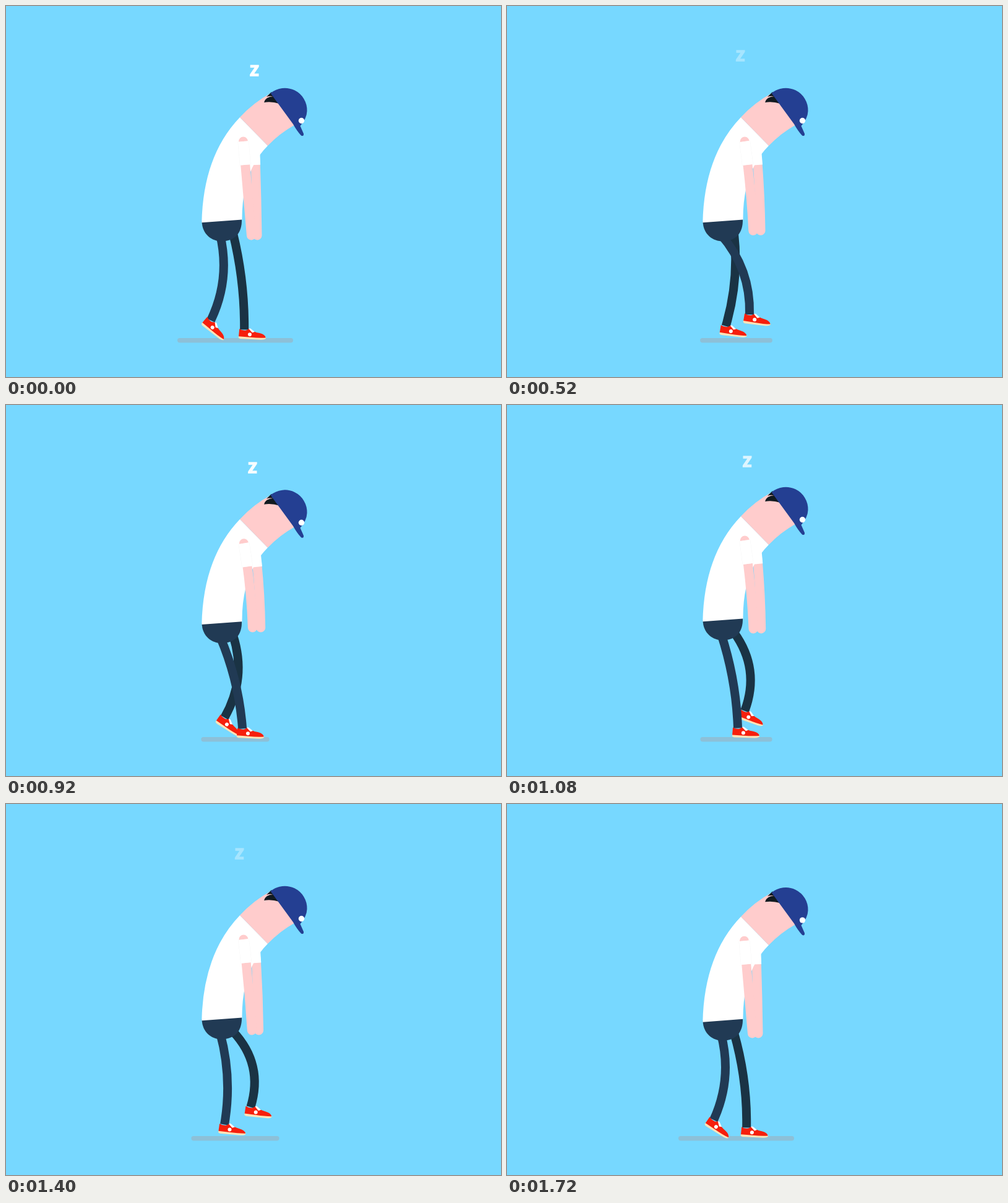
These frames come from a looping animation (800 px wide and 600 px high, 1760 ms). An HTML page:

```html
<!DOCTYPE html>
<html lang="en">
<head>
<meta charset="utf-8">
<title>Sleepwalker</title>
<style>
  html, body { margin: 0; width: 100%; height: 100%; overflow: hidden; background: #77d8ff; }
  svg { display: block; width: 100%; height: 100%; }
  .line { fill: none; }
  .arm { stroke: #fcc; stroke-width: 15; stroke-linecap: round; stroke-dasharray: 0 30 999; }
  .sleeve { stroke: #fff; stroke-dasharray: 38 999; }
  .hem { stroke: #f7f7f7; stroke-width: 18; stroke-dasharray: 38 999; }
  .leg { stroke-width: 14; }
  #z { font: 900 23px Lato, "Open Sans", sans-serif; fill: #fff; stroke: #fff; stroke-width: 1.5px; text-anchor: middle; }
</style>
</head>
<body>
<svg viewBox="0 0 800 600">
  <defs>
    <g id="shoe">
      <path fill="#fde3b8" d="M-8.500 9 L-9 13 Q-8 15 -4 15 L27 15.500 Q35 15.500 35.500 12 L32 9Z"/>
      <path fill="#f61f0c" d="M-8 -1 Q-3 2 3 1 L8 -2 Q14 3 25 5 Q34 7 35 12 Q24 13 10 12 L-8.800 11Z"/>
      <path fill="#fff" d="M7 -1.500 L9.500 -2.500 L17 3 L13 4.500Z"/>
      <circle cx="9" cy="7.500" r="3" fill="#fff"/>
    </g>
  </defs>

  <rect id="shadow" y="537" height="7.500" rx="3.700" fill="#8dc0d8"/>

  <path id="farLeg" class="line leg" stroke="#1a3344"/>
  <use id="farShoe" href="#shoe"/>
  <path id="nearLeg" class="line leg" stroke="#213a54"/>
  <use id="nearShoe" href="#shoe"/>

  <path id="farArm" class="line arm"/>
  <path id="farSleeve" class="line sleeve" stroke-width="15.500"/>

  <g id="body">
    <path fill="#213a54" d="M316.500 348 C317 370 333 380.500 349 380.500 C369 380 382 368 381 344Z"/>
    <path fill="#fff" d="M378 180 Q318.500 242 316.300 350.300 L381.500 345.500 Q381 268 423 226Z"/>
    <path fill="#fcc" d="M378 180 Q400 156 428 141 L467 192 Q442 206 423 226Z"/>
    <path fill="#111a20" d="M421 147 L429 139 L434 147 Q427 144.500 421 147Z M417 156 Q419 147 432 146 L442 158 Q429 154 417 156Z"/>
    <path fill="#243f92" d="M427.500 141 A36 36 0 0 1 486.500 170 Q486 182 475.500 194 L481 206.500 Q481.500 211.500 477 209.500 Q470 202 464 191Z"/>
    <circle cx="477.500" cy="185.500" r="4.700" fill="#fff"/>
  </g>

  <path id="nearArm" class="line arm"/>
  <path id="nearHem" class="line hem"/>
  <path id="nearSleeve" class="line sleeve" stroke-width="17"/>

  <text id="z">Z</text>
</svg>
<script>
  const STEP = 40, STEPS = 44, HALF = STEPS / 2;
  const LANDING = 21, TOE_OFF = LANDING + HALF;

  // Key points of one stride: step, ankle x, shoe angle
  const stride = [[0, 331, 37], [5, 377, 21], [13, 392, 6], [LANDING, 386, 2], [35, 353, 4], [TOE_OFF, 334, 31]];
  const legs = {
    near: { hip: [346, 370], lead: 0, shift: 0, lift: 22, skew: 1 },
    far: { hip: [367, 368], lead: HALF + 1, shift: 3, lift: 31, skew: 1.3 }
  };

  const $ = id => document.getElementById(id);
  const set = (id, attrs) => {
    for (const name in attrs) $(id).setAttribute(name, attrs[name]);
  };

  // Smooth periodic interpolation through key points
  function sample(keys, step) {
    const count = keys.length;
    const at = i => {
      const lap = Math.floor(i / count);
      const [time, ...values] = keys[i - lap * count];
      return { time: time + lap * STEPS, values };
    };
    let i = 0;
    while (i < count - 1 && keys[i + 1][0] <= step) i++;
    const [p, a, b, n] = [at(i - 1), at(i), at(i + 1), at(i + 2)];
    const span = b.time - a.time, u = (step - a.time) / span;
    return a.values.map((va, k) => {
      const vb = b.values[k];
      const slopeA = (vb - p.values[k]) / (b.time - p.time) * span;
      const slopeB = (n.values[k] - va) / (n.time - a.time) * span;
      return va + u * slopeA
        + u * u * (3 * (vb - va) - 2 * slopeA - slopeB)
        + u * u * u * (2 * (va - vb) + slopeA + slopeB);
    });
  }

  // Curve from start to end that passes through mid halfway
  function bend([x0, y0], [mx, my], [x1, y1]) {
    return `M${x0} ${y0}Q${2 * mx - (x0 + x1) / 2} ${2 * my - (y0 + y1) / 2} ${x1} ${y1}`;
  }

  function ankleHeight(phase, lift, skew) {
    if (phase >= LANDING && phase <= TOE_OFF) {
      return 523.5 - 12.5 * ((phase - LANDING) / HALF) ** 2;
    }
    const swing = (phase + STEPS - TOE_OFF) % STEPS / HALF;
    return 511 + 12.5 * swing - lift * Math.sin(Math.PI * swing ** skew);
  }

  // The knee bends forward as the ankle comes closer to the hip
  function drawLeg(side, step, drop) {
    const { hip: [hx, hipY], lead, shift, lift, skew } = legs[side];
    const phase = (step + lead) % STEPS;
    const [strideX, angle] = sample(stride, phase);
    const x = strideX + shift, y = ankleHeight(phase, lift, skew), hy = hipY + drop;
    const dx = x - hx, dy = y - hy, reach = Math.hypot(dx, dy);
    const flex = (5.5 + .43 * (155 - reach)) / reach;
    const knee = [(hx + x) / 2 + flex * dy, (hy + y) / 2 - flex * dx];
    set(side + 'Leg', { d: bend([hx, hy], knee, [x, y]) });
    set(side + 'Shoe', { transform: `translate(${x} ${y}) rotate(${angle})` });
  }

  // The body sinks briefly around each footfall
  function dip(step) {
    const near = center => {
      const d = Math.abs(step - center);
      return d < 4 ? 2.35 * (1 + Math.cos(Math.PI * d / 4)) : 0;
    };
    return near(HALF + 1) + near(STEPS + 1);
  }

  function drawArms(step, drop) {
    const ramp = 1 - Math.abs(step - 21.5) / 21.5;
    const lift = ramp * (1.25 - .25 * ramp);
    const elbowY = 295 - 5 * lift + drop / 2, handY = 371 - 11.5 * lift;
    const nearArm = bend([383.5 + lift, 219 + drop], [390 + 4 * lift, elbowY], [396.5 + 2 * lift, handY]);
    const farArm = bend([402, 219 + drop], [404.5 + 4.5 * lift, elbowY], [406 + 6 * lift, handY]);
    for (const part of ['nearArm', 'nearHem', 'nearSleeve']) set(part, { d: nearArm });
    for (const part of ['farArm', 'farSleeve']) set(part, { d: farArm });
  }

  function draw(step) {
    const drop = dip(step);
    set('body', { transform: `translate(0 ${drop})` });
    drawLeg('near', step, drop);
    drawLeg('far', step, drop);
    drawArms(step, drop);

    const spread = step < 20 ? Math.max(0, 1 - step / 19) : (step - 20) / 23;
    const reach = 54.5 + 39 * spread ** 2;
    set('shadow', { x: 370.5 - reach, width: 2 * reach });

    const phase = step % HALF;
    const rise = 25 * (1 - Math.max(0, 1 - phase / 16) ** 2);
    set('z', { x: 401.5 - rise, y: 113.2 - rise, opacity: Math.max(0, 1 - phase / 20) });
  }

  const start = performance.now();
  function tick() {
    draw(Math.floor((performance.now() - start) / STEP) % STEPS);
    requestAnimationFrame(tick);
  }
  tick();
</script>
</body>
</html>
```
